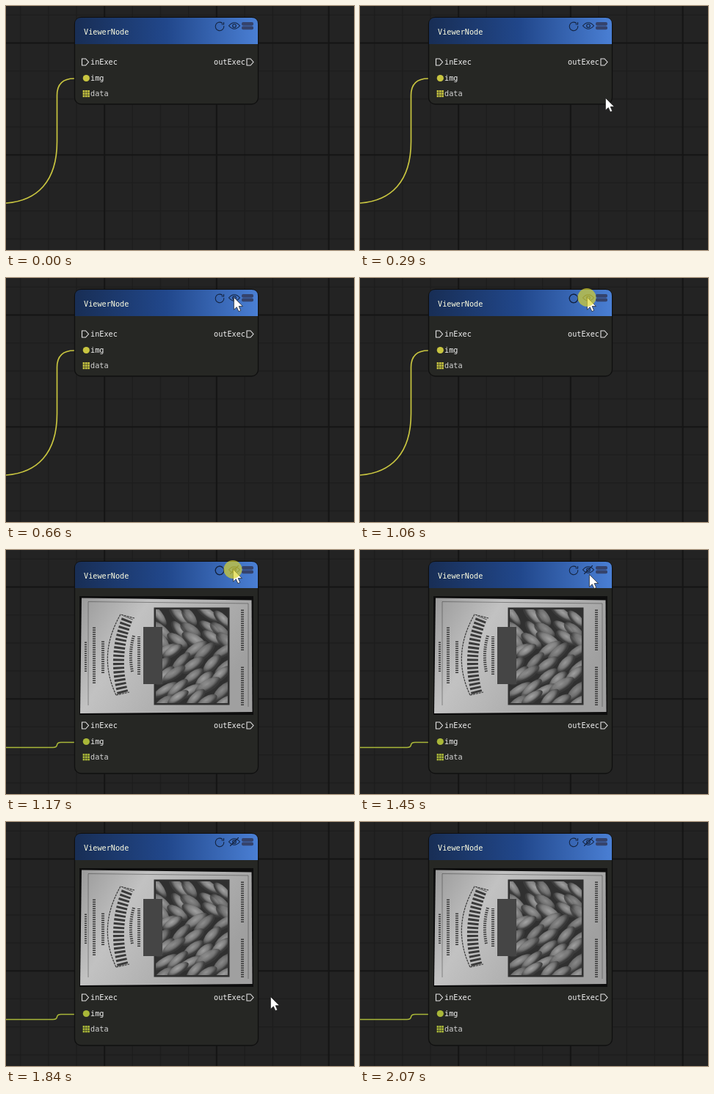
An HTML page for the animation above (2620 ms loop, 474 by 333 pixels).

```html
<!DOCTYPE html>
<html lang="en">
<head>
<meta charset="utf-8">
<title>Viewer node preview</title>
<style>
  html, body { margin: 0; width: 100%; height: 100%; overflow: hidden; background: #232323; }
  svg { display: block; width: 474px; height: 333px; }
  text { font: 10.2px "DejaVu Sans Mono", monospace; fill: #f2f2f2; }
  .accent { fill: currentColor; }
  .wire { fill: none; stroke: currentColor; stroke-width: 1.7; }
  .node { fill: #262724; stroke: #101010; stroke-width: 1.3; }
  .pin { fill: none; stroke: #e4e4e4; stroke-width: 1.1; }
  .icon { fill: none; stroke: #14233f; stroke-width: 1.1; stroke-linecap: round; }
  .print { fill: none; stroke: #3a3a3a; }
</style>
</head>
<body>
<svg viewBox="0 0 474 333">
  <defs>
    <linearGradient id="blue">
      <stop offset="0" stop-color="#182e55"/>
      <stop offset=".5" stop-color="#21478b"/>
      <stop offset="1" stop-color="#4a7fd4"/>
    </linearGradient>
    <linearGradient id="paper" x2="1" y2=".4">
      <stop offset="0" stop-color="#9a9a9a"/>
      <stop offset=".35" stop-color="#c2c2c2"/>
      <stop offset="1" stop-color="#a0a0a0"/>
    </linearGradient>
    <radialGradient id="biscuit" cy=".35">
      <stop offset="0" stop-color="#a6a6a6"/>
      <stop offset=".6" stop-color="#808080"/>
      <stop offset="1" stop-color="#3c3c3c"/>
    </radialGradient>
    <clipPath id="window"><path d="M204 81H302V209H204z"/></clipPath>
  </defs>

  <g id="grid"></g>

  <g id="graph">
    <g id="closed">
      <path class="wire" d="M0 269C42 266 69.500 240 69.500 185V122Q69.500 99 93 99"/>
      <rect class="node" x="93.500" y="15.500" width="250" height="118.500" rx="9"/>
    </g>
    <g id="open">
      <path class="wire" d="M0 269.500H64Q69 269.500 69.500 266Q70 262.500 75 262.500H93"/>
      <rect class="node" x="93.500" y="15.500" width="250" height="289.500" rx="9"/>
      <rect x="100" y="63" width="237" height="162" fill="#0d0d0d"/>
      <path d="M103 65.500L334.500 68.500L335.500 221L101 223z" fill="url(#paper)"/>
      <path d="M112 212V70.500L330 73V214" class="print" stroke-width=".8" opacity=".6"/>
      <rect x="201.500" y="78.500" width="103" height="133" fill="#303030"/>
      <g id="biscuits" clip-path="url(#window)" fill="url(#biscuit)"></g>
      <g id="print"></g>
      <rect x="187" y="105" width="26" height="78" fill="#454545"/>
    </g>

    <path d="M94 52V24.500Q94 16 102.500 16H334.500Q343 16 343 24.500V52z" fill="url(#blue)"/>
    <text x="106" y="39" style="fill:#ffffe2">ViewerNode</text>

    <g class="icon">
      <path d="M294.500 23.300A5.800 5.800 0 1 0 296.800 27.500"/>
      <path id="arrow" d="M294 25H296.600V22.500"/>
      <path id="ring" d="M285.200 28a5.800 5.800 0 1 0 11.600 0a5.800 5.800 0 1 0-11.600 0"/>
      <path d="M303.500 27Q311 18.500 318.500 27Q311 35.500 303.500 27z"/>
      <circle cx="311" cy="27" r="2.300"/>
      <path id="slash" d="M305.500 32.500L316.500 21.500"/>
    </g>
    <g fill="#35436c">
      <rect x="321" y="22" width="16" height="4.700" rx="2"/>
      <rect x="321" y="27.500" width="16" height="4.700" rx="2"/>
    </g>

    <g id="ports">
      <path class="pin" d="M103.500 72H108.500L112.500 76.500L108.500 81H103.500z"/>
      <text x="115" y="80">inExec</text>
      <text x="283" y="80">outExec</text>
      <path class="pin" d="M328 72H333L337 76.500L333 81H328z"/>
      <circle class="accent" cx="109.300" cy="98.500" r="4.600"/>
      <text x="115" y="101.500">img</text>
      <g id="dots" class="accent"></g>
      <text x="115" y="123" style="fill:#d4d4d4">data</text>
    </g>
  </g>

  <path id="cursor" d="M.4.400V17.200L4.300 13.700L6.900 19.600L9.700 18.400L7.200 12.600H12.400z"
        fill="#fff" stroke="#161616" stroke-width=".7"/>
  <circle id="click" cx="309" cy="26.500" r="12.500" fill="#dcd62c" fill-opacity=".68"/>
</svg>

<script>
const LOOP = 2620;
const PRESS = 1060, EXPAND = 1170, RELEASE = 1220;
const $ = id => document.getElementById(id);

function add(parent, tag, attrs) {
  const el = document.createElementNS("http://www.w3.org/2000/svg", tag);
  for (const name in attrs) el.setAttribute(name, attrs[name]);
  return parent.appendChild(el);
}

// Grid: every fourth line is heavy.
function gridLines(major) {
  for (let i = -4; i < 10; i++) {
    if ((i % 4 === 0) !== major) continue;
    const x = 134.2 + i * 38.17, y = 50.6 + i * 38.17;
    add($("grid"), "path", {
      d: `M${x} 0V333M0 ${y}H474`,
      stroke: major ? "#151515" : "#1d1d1d",
      "stroke-width": major ? 2 : 1.2
    });
  }
}
gridLines(false);
gridLines(true);

for (let i = 0; i < 9; i++) {
  add($("dots"), "rect", {
    x: 104.6 + i % 3 * 3.3, y: 115 + Math.floor(i / 3) * 3.3, width: 2.7, height: 2.7
  });
}

// Biscuits in the package window: falling in the upper rows, rising below
let seed = 17;
const random = () => (seed = seed * 16807 % 2147483647) / 2147483647;
for (let i = 0; i < 40; i++) {
  const row = Math.floor(i / 5);
  const x = 206 + i % 5 * 21 + random() * 12;
  const y = 86 + row * 16.5 + random() * 9;
  const angle = (row < 3 ? 32 : -48) + random() * 24;
  add($("biscuits"), "ellipse", {
    cx: x, cy: y, rx: 15 + random() * 5, ry: 6.5 + random() * 2,
    opacity: 0.75 + random() * 0.25,
    transform: `rotate(${angle} ${x} ${y})`
  });
}

// Lettering on the package, reduced to broken strokes: path, width, dashes
[
  ["M108.500 166V124", 3, "1.500 1.500"],
  ["M120 182V105", 4, "1.500 1.500"],
  ["M132 168V124", 4, "1.500 1.500"],
  ["M150 198Q124 143 156 88L175 93", 1.2, "3 1"],
  ["M150 198L168 194", 1.2, "3 1"],
  ["M159 195Q145 143 166 92", 15, "3 2.500"],
  ["M172 166Q167 141 174 117", 4, "1.500 1.500"],
  ["M181 170V118", 4, "1.500 1.500"],
  ["M322 212V158", 4, "1.500 1.500"],
  ["M322 137V80", 4, "1.500 1.500"]
].forEach(([d, width, dash]) => add($("print"), "path", {
  d, class: "print", "stroke-width": width, "stroke-dasharray": dash
}));

// Hard steps: each style holds until the next time.
function play(id, steps) {
  const frames = steps.map(([time, style]) => ({ ...style, offset: time / LOOP, easing: "step-end" }));
  frames.push({ ...steps.at(-1)[1], offset: 1 });
  $(id).animate(frames, { duration: LOOP, iterations: Infinity });
}

const show = { opacity: 1 }, hide = { opacity: 0 };
const showBetween = (id, from, to) => play(id, [[0, hide], [from, show], [to, hide]]);
const at = (x, y) => ({ transform: `translate(${x}px, ${y}px)`, opacity: 1 });
const away = { transform: "translate(390px, 340px)", opacity: 0 };

play("cursor", [
  [0, away],
  [70, at(390, 317)], [150, at(370, 254)], [220, at(350, 186)], [290, at(334, 125)],
  [370, at(328, 82)], [440, at(325, 52)], [520, at(323, 34)],
  [600, at(315, 29)], [660, at(310, 26)], [750, at(309, 27)], [830, at(309, 26)],
  [1450, at(312, 33)], [1530, at(321, 56)], [1600, at(332, 87)], [1680, at(341, 120)],
  [1760, at(350, 175)], [1830, at(360, 238)], [1910, at(368, 290)],
  [1990, at(386, 322)], [2070, away]
]);
showBetween("click", PRESS, RELEASE);
showBetween("ring", PRESS, RELEASE);
play("arrow", [[0, show], [PRESS, hide], [RELEASE, show]]);
play("closed", [[0, show], [EXPAND, hide]]);
play("open", [[0, hide], [EXPAND, show]]);
play("slash", [[0, hide], [EXPAND, show]]);
play("ports", [[0, { transform: "translateY(0px)" }], [EXPAND, { transform: "translateY(163px)" }]]);
play("graph", [[0, { color: "#c8c540" }], [EXPAND, { color: "#a9b738" }]]);
</script>
</body>
</html>
```
